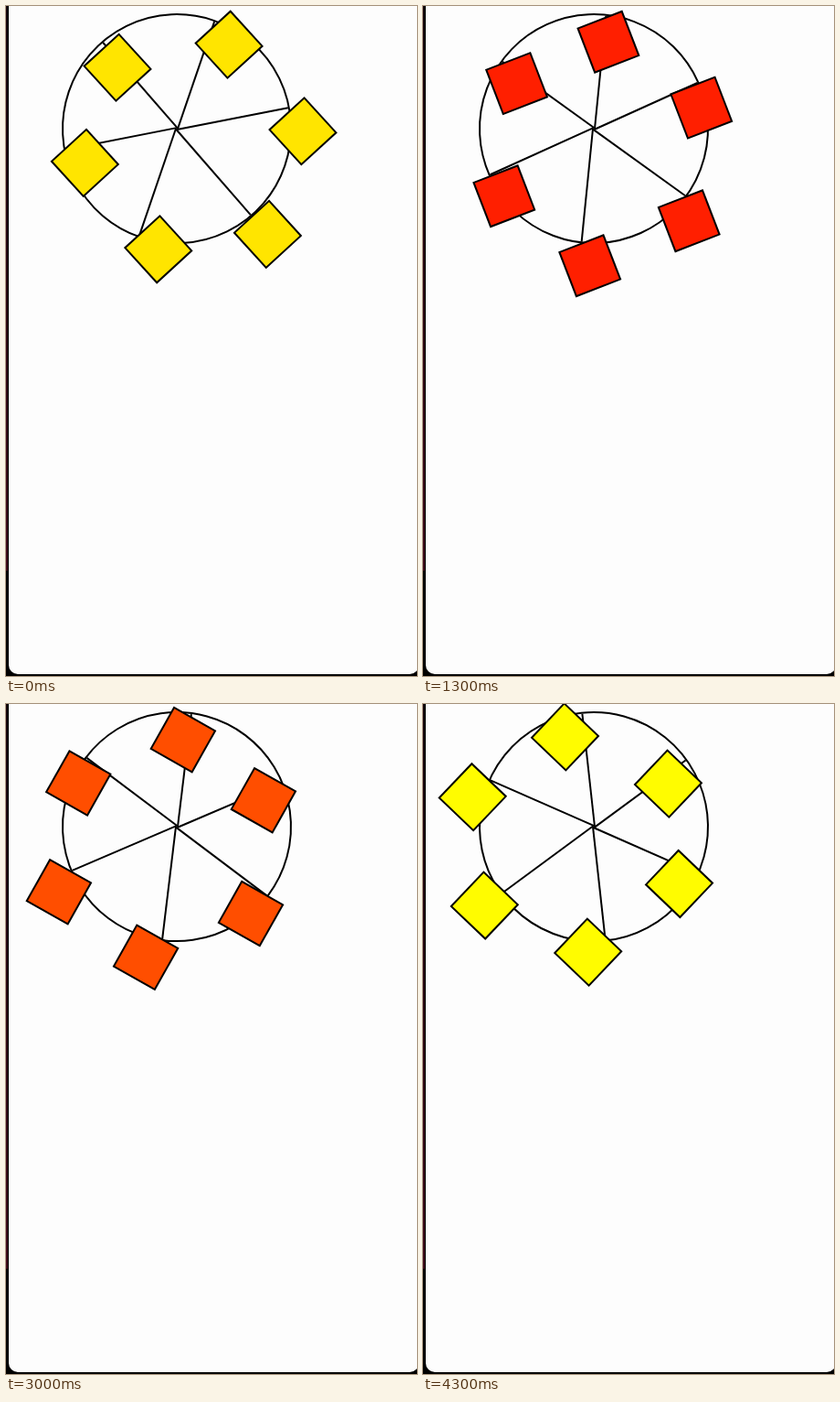
Write an HTML page with a canvas that moves like this. It is 450 px wide and 732 px high and loops after 4400 ms.

```html
<!DOCTYPE html>
<html lang="en">
<head>
<meta charset="utf-8">
<title>Ferris wheel</title>
<style>
  html, body { margin: 0; width: 100%; height: 100%; overflow: hidden; background: #000; }
  canvas { display: block; }
</style>
</head>
<body>
<canvas id="stage" width="450" height="732"></canvas>
<script>
const ctx = document.getElementById('stage').getContext('2d');

const LOOP = 4400, STEP = 100;   // ms
const TURN = 10, START = 8.025;  // seconds per turn, phase at the loop start
const CX = 187, CY = 134.1;
const SIZE = 248, BORDER = 2;    // wheel inside its border
const CABIN = SIZE * 0.2 + 2 * BORDER;
const RAD = Math.PI / 180;

// Top centre of each cabin, relative to the hub
const fromLeft = p => SIZE * (p - 0.5) + CABIN / 2;
const fromRight = p => SIZE * (0.5 - p) - CABIN / 2;
const fromTop = p => SIZE * (p - 0.5);
const cabins = [
  [fromRight(-0.085), fromTop(0.503)],
  [fromRight(0.17), fromTop(0.935)],
  [fromRight(0.65), fromTop(0.935)],
  [fromLeft(-0.085), fromTop(0.5)],
  [fromLeft(0.17), fromTop(0.07)],
  [fromRight(0.17), fromTop(0.07)]
];

// cubic-bezier(.42, 0, .58, 1)
function easeInOut(x) {
  let lo = 0, hi = 1;
  for (let i = 0; i < 30; i++) {
    const s = (lo + hi) / 2, r = 1 - s;
    if (1.26 * r * r * s + 1.74 * r * s * s + s * s * s < x) lo = s;
    else hi = s;
  }
  return lo * lo * (3 - 2 * lo);
}

// Red to yellow in the first quarter turn, yellow to red in the last
function cabinColor(p) {
  const quarter = Math.min(p, 1 - p) * 4;
  const mix = p < 0.5 ? easeInOut(quarter) : 1 - easeInOut(1 - quarter);
  return `rgb(255, ${Math.round(255 * Math.pow(mix, 1.12))}, 0)`;
}

function drawWindow() {
  ctx.fillStyle = '#000';
  ctx.fillRect(0, 0, 450, 732);
  const edge = ctx.createLinearGradient(0, 0, 0, 617);
  edge.addColorStop(0, '#14000a');
  edge.addColorStop(1, '#40081c');
  ctx.fillStyle = edge;
  ctx.fillRect(0, 0, 2, 617);
  ctx.fillStyle = '#fdfdfd';
  ctx.beginPath();
  ctx.roundRect(3, -20, 449, 750, 10);
  ctx.fill();
}

function drawWheel(p) {
  const color = cabinColor(p);
  ctx.save();
  ctx.translate(CX, CY);
  ctx.rotate(p * 360 * RAD);

  ctx.strokeStyle = '#000';
  ctx.lineWidth = BORDER;
  ctx.beginPath();
  ctx.arc(0, 0, SIZE / 2 + BORDER / 2, 0, 2 * Math.PI);
  ctx.stroke();

  ctx.fillStyle = '#000';
  for (let i = 0; i < 6; i++) {
    ctx.fillRect(0, 0, SIZE / 2, 2);
    ctx.rotate(60 * RAD);
  }

  const swing = -360 * easeInOut(p) * RAD;
  for (const [x, y] of cabins) {
    ctx.save();
    ctx.translate(x, y);
    ctx.rotate(swing);
    ctx.fillStyle = '#000';
    ctx.fillRect(-CABIN / 2, 0, CABIN, CABIN);
    ctx.fillStyle = color;
    ctx.fillRect(BORDER - CABIN / 2, BORDER, CABIN - 2 * BORDER, CABIN - 2 * BORDER);
    ctx.restore();
  }
  ctx.restore();
}

function render(now) {
  const t = Math.floor((now % LOOP) / STEP) * STEP;
  drawWindow();
  drawWheel((START + t / 1000) / TURN % 1);
}

const origin = performance.now();
function tick() {
  render(performance.now() - origin);
  requestAnimationFrame(tick);
}
tick();
</script>
</body>
</html>
```
